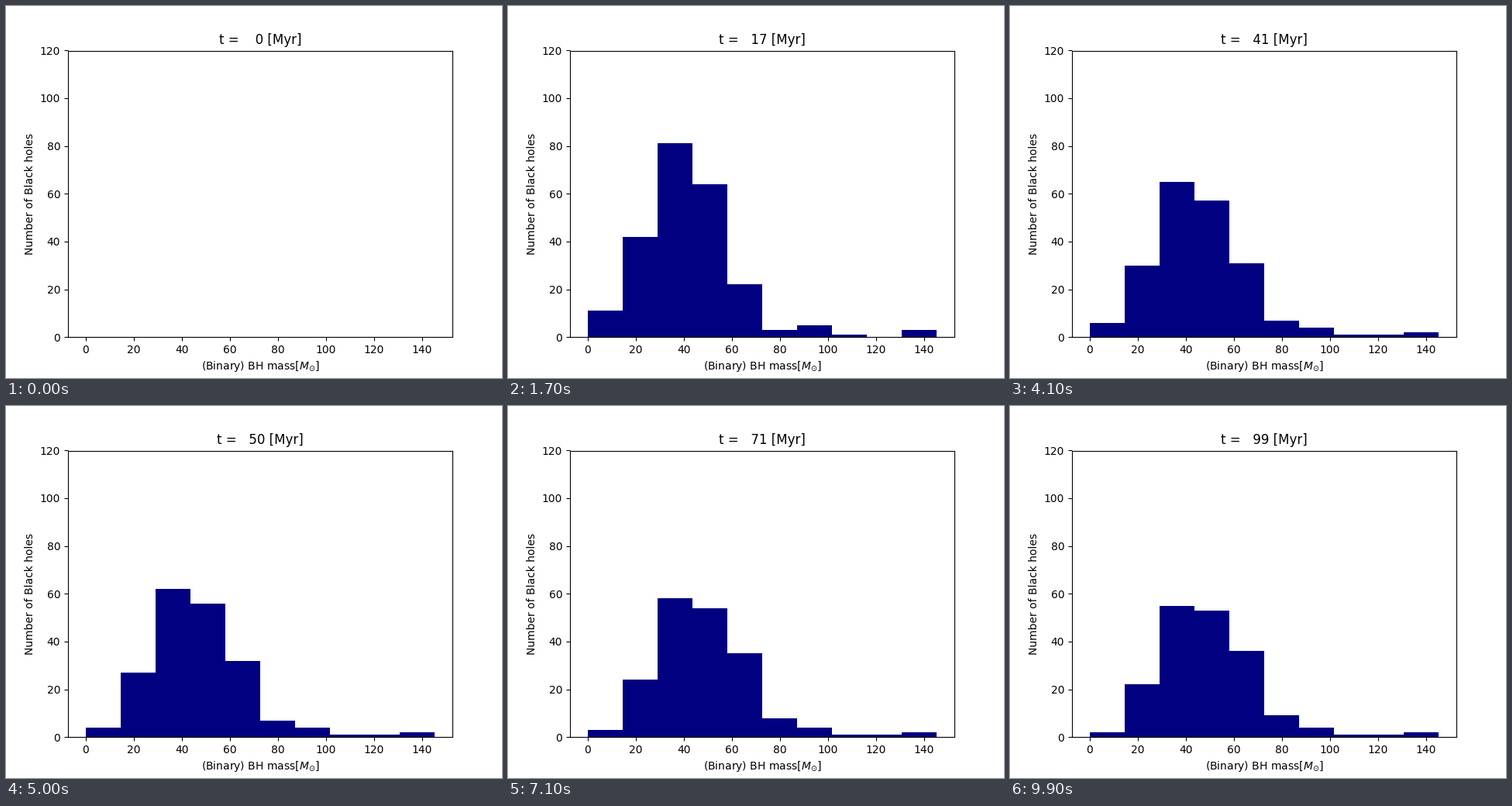
A matplotlib script that plays this animation: 640x480 px, repeating every 10 s.

```python
import numpy as np
import matplotlib.pyplot as plt
from matplotlib.animation import FuncAnimation

FRAMES = 100
INTERVAL = 100
MAX_MASS = 145.32
MAX_COUNT = 119.88

# bin counts once the holes have formed, and at the end of the run
T_EARLY, T_LATE = 17, FRAMES - 1
EARLY = np.array([11, 42, 81, 64, 22, 3, 5, 1, 0, 3])
LATE = np.array([2, 22, 55, 53, 36, 9, 4, 1, 1, 2])
T_BIRTH, T_FORMED = 3, 10
DECAY = 28


def relax(t):
    return 1 - np.exp(-(t - T_EARLY) / DECAY)


def counts(t):
    """Holes form quickly, then the distribution relaxes exponentially."""
    formed = np.clip((t - T_BIRTH) / (T_FORMED - T_BIRTH), 0, 1)
    level = EARLY + (LATE - EARLY) * relax(t) / relax(T_LATE)
    return np.rint(formed * np.clip(level, 0, None))


fig, ax = plt.subplots(figsize=(6.4, 4.8), dpi=100)
width = MAX_MASS / len(EARLY)
bars = ax.bar(np.arange(len(EARLY)) * width, counts(0), width,
              align="edge", color="navy")
ax.set_xlim(-0.05 * MAX_MASS, 1.05 * MAX_MASS)
ax.set_ylim(0, MAX_COUNT)
ax.set_yticks(range(0, 120, 20))
ax.set_xlabel(r"(Binary) BH mass[$M_{\odot}$]")
ax.set_ylabel("Number of Black holes", labelpad=4)
title = ax.set_title("")

# the top tick lies just above the upper limit
side = ax.get_yaxis_transform()
ax.plot(0, 120, marker=0, ms=3.5, mew=0.8, color="black",
        transform=side, clip_on=False)
ax.annotate("120", (0, 120), xycoords=side, xytext=(-7, 0),
            textcoords="offset points", ha="right", va="center_baseline",
            annotation_clip=False)


def update(t):
    for bar, n in zip(bars, counts(t)):
        bar.set_height(n)
    title.set_text(f"t = {t:4d} [Myr]")
    return [*bars, title]


anim = FuncAnimation(fig, update, frames=FRAMES, interval=INTERVAL,
                     repeat=True, repeat_delay=0, blit=False)
plt.show()
```
